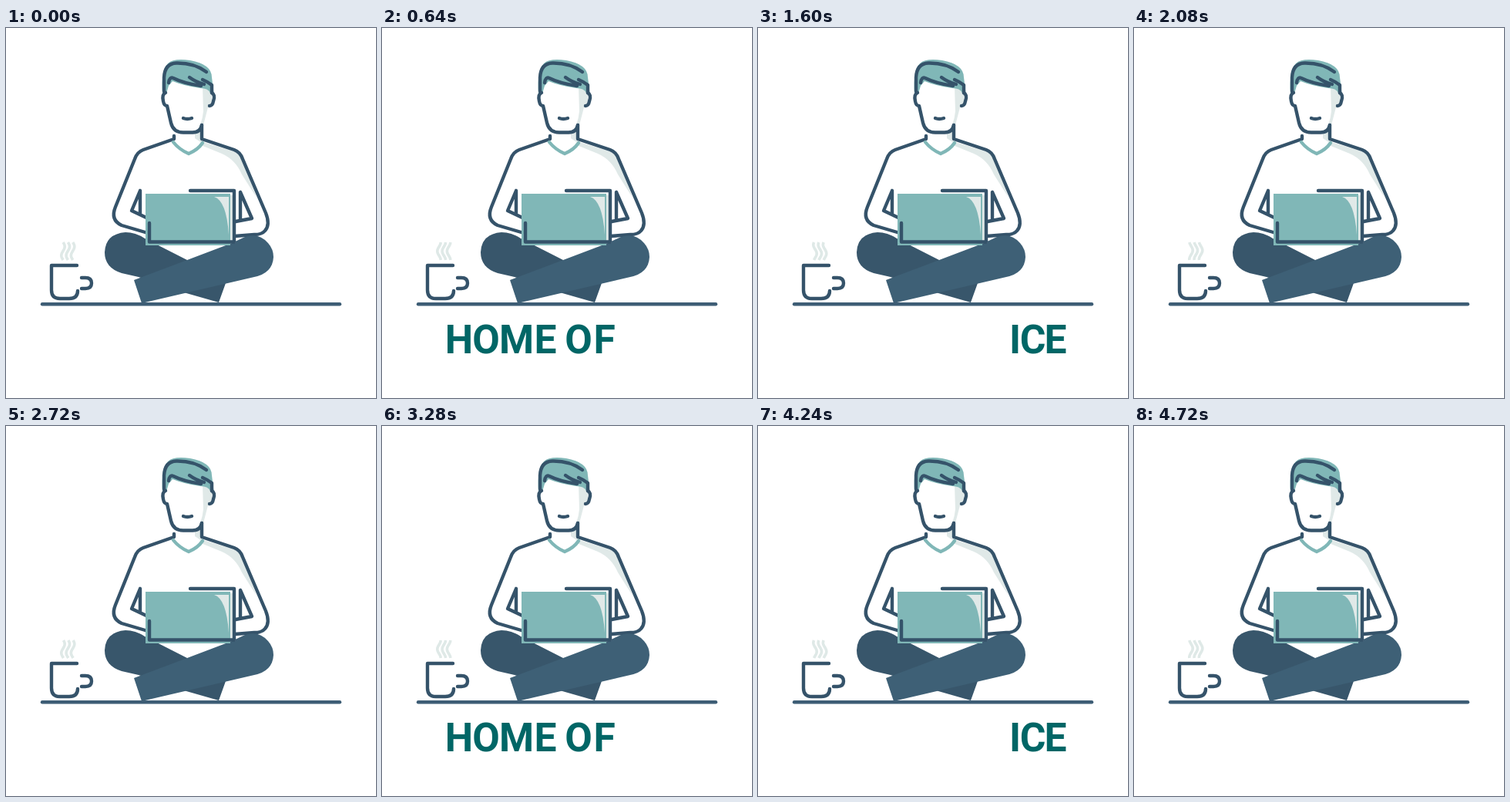
Write an HTML page that moves like this. It is 480x480 px and loops after 4.8 s.

```html
<!DOCTYPE html>
<html lang="en">
<head>
<meta charset="utf-8">
<title>Home office</title>
<style>
  html, body { margin: 0; width: 100%; height: 100%; overflow: hidden; background: #fff; }
  svg { display: block; width: 100vw; height: 100vh; }
  .line { fill: none; stroke: #35536a; stroke-width: 4.4; stroke-linecap: round; stroke-linejoin: round; }
  .teal { fill: #80b7b7; }
  .shade { fill: #e0e9e8; }
  #steam { fill: none; stroke: #dfe9e7; stroke-width: 3.6; }
  #word { font: bold 51.5px Roboto, "Open Sans", sans-serif; fill: #006666; text-anchor: middle; }
</style>
</head>
<body>
<svg viewBox="0 0 480 480">
  <!-- shading -->
  <path class="shade" d="M255 76L267 80V101L262 103L256 126L254 149L245 143V136Q254 128 256 108Z"/>
  <path class="shade" d="M256 148L296 160Q304 164 308 173L325 220L306 190Q298 171 280 163L253 152Z"/>

  <!-- head -->
  <path class="teal" d="M203 85Q201 55 210 46Q217 39 239 42Q267 47 267 64L270 88L265 84Q262 78 252 78Q231 75 216 69L211 75L208 85Z"/>
  <g class="line">
    <path d="M205 82V64Q206 46 221 45.5Q244 45 260 57"/>
    <path d="M211 71Q212 63 217 65Q231 72 253 75M238 64Q246 70 257 73M255 67Q262 70 267 74V84"/>
    <path d="M207 84Q202 86 204 95Q205 101 209 101L214 123Q217 135.5 230 135.5H241Q252 136 254 126"/>
    <path d="M267 84Q272 87 269 95Q268 101 264 101"/>
    <path d="M230 117Q235 119 241 117"/>
  </g>

  <!-- body and arms -->
  <g class="line">
    <path d="M218 140V144L178 158Q170 161 167 170L142 232Q135 249 150 256L184 266"/>
    <path d="M254 126V144L296 158Q304 161 307 170L337 240Q343 255 336 263Q332 268 322 268L297 270"/>
    <path d="M174 211L163 237L182 246M174 211V241M304 213L319 247L298 251M304 213V248"/>
  </g>
  <path class="line" style="stroke:#80b7b7" d="M217 148Q225 158 237 163Q249 158 255 149"/>

  <!-- legs -->
  <path fill="#38566b" d="M155 265Q168 265 180 273L235 301L285 331L276 356L234 344L172 323L150 318Q128 311 128 291Q129 267 155 265Z"/>
  <path fill="#3e6076" d="M166 327L235 301L293 279L310 271Q328 265 340 279Q347 287 347 297Q346 318 322 323L176 357Z"/>

  <!-- laptop -->
  <path fill="#fff" d="M181 212H298V279H181Z"/>
  <path class="shade" d="M289 217H294V276H289Z"/>
  <path class="teal" d="M181 215H291V282H181Z"/>
  <path class="shade" d="M270 219H289V268Q286 224 270 219Z"/>
  <path class="line" d="M239 211H296V277.5H186V253"/>

  <!-- mug and floor -->
  <path class="line" d="M92 308H59V340Q59 351 70 351H82Q93 351 93 341M98 324H103Q111 324 111 331T103 338H98"/>
  <path class="line" style="stroke:#3d5d75" d="M47 358.2H433"/>
  <path id="steam"/>
  <g id="word"></g>
</svg>
<script>
  const STEP = 80, LOOP = 4800, CYCLE = 33;
  const TYPE_AT = 2, ERASE_AT = 14;
  const steam = document.getElementById('steam');
  const word = document.getElementById('word');
  const centers = [100, 135, 174.5, 212, 0, 255, 288.5, 314, 333.5, 356.5, 386];

  // The space takes one step when typing, none when erasing.
  const letters = [...'HOME OFFICE'].map((char, i) => ({ char, from: TYPE_AT + i, x: centers[i] }))
    .filter(l => l.char !== ' ')
    .map((l, k) => {
      const node = document.createElementNS('http://www.w3.org/2000/svg', 'text');
      node.textContent = l.char;
      node.setAttribute('x', l.x);
      node.setAttribute('y', 422);
      word.append(node);
      return { node, from: l.from, to: ERASE_AT + k };
    });

  function wisp(x, phase) {
    let d = '';
    for (let y = 0; y <= 23; y++) {
      const dx = 2.2 * Math.cos(2 * Math.PI * (y / 23 + phase));
      d += `${y ? 'L' : 'M'}${(x + dx).toFixed(2)} ${278 + y}`;
    }
    return d;
  }

  function draw(now) {
    const step = Math.floor(now % LOOP / STEP) % CYCLE;
    for (const { node, from, to } of letters)
      node.setAttribute('visibility', step >= from && step < to ? 'visible' : 'hidden');
    const phase = (step - 8) / CYCLE;
    steam.setAttribute('d', [74, 80.3, 86.6].map(x => wisp(x, phase)).join(''));
    requestAnimationFrame(draw);
  }
  draw(0);
</script>
</body>
</html>
```
